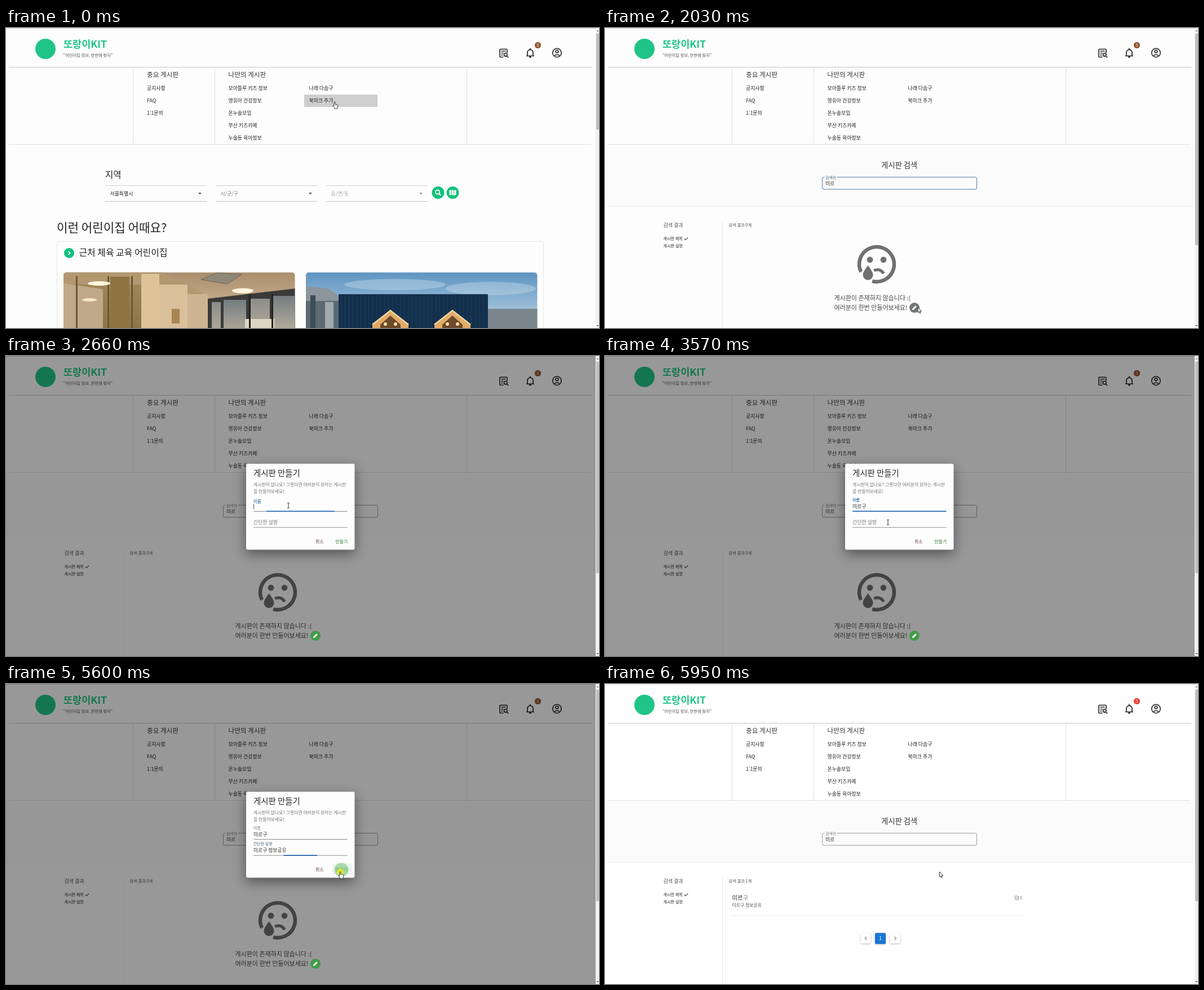
Recreate the animation shown at these times as an HTML page with a canvas. Size 1052 by 532 pixels, loop 6020 ms.

```html
<!DOCTYPE html>
<html lang="ko">
<head>
<meta charset="utf-8">
<style>
html, body { margin: 0; width: 100%; height: 100%; overflow: hidden; background: #fdfdfd; }
canvas { display: block; }
</style>
</head>
<body>
<canvas width="1052" height="532"></canvas>
<script>
const c = document.querySelector('canvas').getContext('2d');
const LOOP = 6020, STEP = 70, GREEN = '#0fc27b', BLUE = '#1976d2';
const PAGE = 280, EMPTY = 1120, OPEN = 2100, CLOSE = 5670, DONE = 5740;
let t = 0;

const ease = (start, dur = 200) => {
  const p = Math.min(1, Math.max(0, (t - start) / dur));
  return 1 - (1 - p) ** 3;
};
const between = (a, b) => t >= a && t < b;
const typed = (start, step, stages) =>
  t < start ? '' : stages[Math.min(stages.length - 1, Math.floor((t - start) / step))];

function text(s, x, cy, size, color = '#333', weight = 400, align = 'left') {
  c.font = `${weight} ${size}px "Noto Sans CJK KR", "Noto Sans CJK", sans-serif`;
  c.textAlign = align;
  c.fillStyle = color;
  c.fillText(s, x, cy + size * .37);
}
function rect(x, y, w, h, color, r = 0) {
  c.fillStyle = color;
  c.beginPath();
  c.roundRect(x, y, w, h, r);
  c.fill();
}
function frame(x, y, w, h, color, r, lw = 1) {
  c.strokeStyle = color;
  c.lineWidth = lw;
  c.beginPath();
  c.roundRect(x, y, w, h, r);
  c.stroke();
}
function disc(x, y, r, color, ry = r) {
  c.fillStyle = color;
  c.beginPath();
  c.ellipse(x, y, r, ry, 0, 0, 7);
  c.fill();
}
function ring(x, y, r, color, lw, a = 0, b = 2 * Math.PI) {
  c.strokeStyle = color;
  c.lineWidth = lw;
  c.beginPath();
  c.arc(x, y, r, a, b);
  c.stroke();
}
function path(d, x, y, fill, stroke, lw = 1) {
  const p = new Path2D(d);
  c.save();
  c.translate(x, y);
  if (fill) { c.fillStyle = fill; c.fill(p); }
  if (stroke) { c.strokeStyle = stroke; c.lineWidth = lw; c.stroke(p); }
  c.restore();
}
function alpha(a, draw) {
  c.save();
  c.globalAlpha *= a;
  draw();
  c.restore();
}
const hline = (x1, x2, y, color, h = 1) => rect(x1, y, x2 - x1, h, color);
const vline = (x, y1, y2, color) => rect(x, y1, 1, y2 - y1, color);

function gradient(x, y, w, h, ...colors) {
  const g = c.createLinearGradient(0, y, 0, y + h);
  colors.forEach((col, i) => g.addColorStop(i / (colors.length - 1), col));
  c.fillStyle = g;
  c.fillRect(x, y, w, h);
}

function header() {
  hline(0, 1046, 0, '#dcdcdc');
  disc(70, 37, 18, '#1fc486');
  text('또랑이KIT', 102, 29, 17.5, '#1fc486', 700);
  text('"어린이집 정보, 한번에 찾자"', 101.5, 48, 7.3, '#555');
  hline(5, 1040, 69, '#c6c6c6');

  const ink = '#222';
  path('M7 14.5H1.5a1 1 0 0 1-1-1V1.5a1 1 0 0 1 1-1h11a1 1 0 0 1 1 1V7M3 4h8M3 7.5h4M3 11h3', 875.5, 37, null, ink, 1.6);
  ring(886.3, 47.3, 2.8, ink, 1.6);
  path('M0 0L3 3', 888.3, 49.5, null, ink, 1.7);
  path('M0 13H14M2 13V7a5 5 0 0 1 10 0V13', 923, 36.5, null, ink, 1.7);
  disc(930, 37.5, 1.4, ink);
  disc(930, 51.3, 1.7, ink);
  ring(977.5, 44, 7.7, ink, 1.6);
  ring(977.5, 41.6, 2.4, ink, 1.6);
  path('M-5 5Q0 .5 5 5', 977.5, 44.5, null, ink, 1.6);
  disc(943.5, 30.5, 5.6, t >= DONE ? '#f44336' : '#92572f');
  text('5', 943.5, 30.6, 6.8, '#fff', 400, 'center');
}

function menu() {
  [225, 370, 817].forEach(x => vline(x, 70, 206, '#e1e1e1'));
  hline(5, 1039, 206, '#dedede');
  text('중요 게시판', 250, 83, 11.6);
  text('나만의 게시판', 394.5, 83, 11.6);
  if (t < PAGE) rect(529, 118, 130, 22, '#cecece');
  const column = (x, items) => items.forEach((s, i) => text(s, x, 107 + 22 * i, 8.9, '#222'));
  column(250, ['공지사항', 'FAQ', '1:1문의']);
  column(394.5, ['모아플루 키즈 정보', '영유아 건강정보', '온누솔모임', '부산 키즈카페', '누솔동 육아정보']);
  column(537.5, ['나래 다솜구', '북마크 추가']);
}

function roomPhoto() {
  gradient(102, 433, 411, 99, '#a98d6d', '#c4a987', '#b89a76');
  path('M0 0H175L245 36V99H0Z', 102, 433, '#b39770');
  gradient(102, 455, 170, 77, '#a08558', '#8e7346');
  path('M0 20L70 30V99H0Z', 102, 433, '#c0a988');
  rect(185, 441, 34, 91, '#8d7442');
  rect(240, 436, 32, 96, '#ddc397');
  rect(272, 455, 50, 77, '#d9c09a');
  rect(294, 498, 14, 26, '#a98454');
  rect(322, 472, 36, 60, '#cdb593');
  path('M0 18L155 0V70H0Z', 358, 462, '#3a3a38');
  [[365, 486, 16], [386, 482, 40], [432, 480, 36], [474, 475, 38]].forEach(([x, y, w], i) =>
    gradient(x, y, w, 60, i % 2 ? '#737c80' : '#8c8d88', '#b4ad9c'));
  rect(424, 516, 52, 16, '#ddd6c5');
  [124, 180, 222, 431, 471].forEach(x => rect(x, x > 300 ? 472 : 440, 3, 100, x > 300 ? '#222' : '#6d5632'));
  path('M0 12L28 0L72 3L46 20Z', 346, 434, '#8f8778', '#6d6558');
  disc(165, 453, 20, '#fff4dd', 4);
  disc(420, 466, 19, '#fff4dd', 4.5);
  disc(148, 482, 13, '#f6e5c4', 3);
}

function housePhoto() {
  gradient(532, 433, 411, 99, '#5f94c2', '#8db4d3', '#c3d3de');
  alpha(.35, () => { disc(690, 455, 90, '#d5e4ee', 10); disc(860, 462, 80, '#d5e4ee', 12); });
  path('M0 16L40 20L62 36V90H0Z', 532, 442, '#8c959c');
  path('M0 42H60V90H0Z', 532, 442, '#5c6a73');
  rect(540, 474, 9, 58, '#3f4c55');
  rect(566, 486, 15, 46, '#a2abb0');
  rect(855, 498, 88, 34, '#7a858c');
  rect(590, 472, 265, 60, '#12304b');
  alpha(.25, () => { for (let x = 594; x < 855; x += 7) vline(x, 472, 532, '#406582'); });
  [682, 792].forEach(x => {
    path('M0 0L32 25V40H-32V25Z', x, 500, '#e2ab68');
    path('M-32 26L0 1L32 26', x, 500, null, '#f2d4a4', 2.5);
    path('M0 10L18 26V40H-18V26Z', x, 500, '#6d4a2c');
    disc(x - 9, 525, 3, '#ffe2a5');
    disc(x + 9, 525, 3, '#ffe2a5');
  });
}

function homePage() {
  text('지역', 176, 260, 15.5, '#222');
  [['서울특별시', '#222'], ['시/군/구', '#777'], ['읍/면/동', '#aaa']].forEach(([s, color], i) => {
    const x = 176 + 196 * i;
    hline(x, x + 180, 279, '#d0d0d0');
    hline(x, x + 180, 307, '#c4c4c4');
    text(s, x + 8.5, 293.5, 8.9, color);
    path('M-3 -1.5H3L0 1.7Z', x + 168, 293.5, i < 2 ? '#555' : '#999');
  });
  disc(766.5, 292, 11, GREEN);
  ring(765.5, 291, 3.6, '#fff', 1.9);
  path('M0 0L3.2 3.2', 768, 293.5, null, '#fff', 2);
  disc(792.5, 292, 11, GREEN);
  path('M-6 -4L-2.4 -5.2V3.8L-6 5ZM-1.6 -5.2L1.6 -4V5L-1.6 3.8ZM2.4 -4L6 -5.2V3.8L2.4 5Z', 792.5, 292, '#fff');

  text('이런 어린이집 어때요?', 90, 354, 21.2, '#222');
  frame(90.5, 378.5, 863, 200, '#e6e6e6', 3);
  disc(112, 399, 9, GREEN);
  path('M-1.5 -3L1.7 0L-1.5 3', 112, 399, null, '#fff', 1.8);
  text('근처 체육 교육 어린이집', 129.5, 398, 15.9, '#222');
  [[102, roomPhoto], [532, housePhoto]].forEach(([x, photo]) => {
    c.save();
    c.beginPath();
    c.roundRect(x, 433.5, 410.5, 120, 5);
    c.clip();
    photo();
    c.restore();
  });
}

function searchBox() {
  const focus = ease(700) * (1 - ease(1960)), up = ease(700), value = typed(910, 140, ['ㅁ', '미', '밀', '미르']);
  const hover = between(560, 1260);
  frame(385.5, 264.5, 274, 21.5, hover ? '#333' : '#999', 3);
  alpha(focus, () => frame(385.5, 264.5, 274, 21.5, BLUE, 3, 1.7));
  if (up > 0) rect(389.5, 263, 22 * up, 3, '#fbfbfb');
  const label = color => text('검색어', 391, 275 - 10 * up, 8.8 - 2 * up, color);
  label('#777');
  alpha(focus, () => label(BLUE));
  text(value, 391, 275.3, 8.8, '#333');
  if (between(700, 1960) && t % 1060 < 780) vline(391 + c.measureText(value).width, 270, 280, '#555');
}

function item(y, title, rest, desc, count) {
  text(title, 225.5, y, 10.4, rest ? '#222' : '#555');
  if (rest) text(rest, 225.5 + c.measureText(title).width, y, 10.4, '#777');
  text(desc, 225.5, y + 13.5, 7.85, '#555');
  frame(727, y - 3, 5, 3.6, '#888', 1, .9);
  path('M2 5H7V-1M2 2V5', 726.5, y - 1.5, null, '#888', .9);
  text(count, 736.5, y, 7, '#777');
  hline(225, 741, y + 31, '#ebebeb');
}

function sadFace() {
  const gray = '#707070';
  ring(482, 419, 31, gray, 6.5, 2.69, 1.83 + 2 * Math.PI);
  disc(470, 411, 5.4, gray);
  disc(494, 411, 5.4, gray);
  path('M477 430Q488 425.5 494.5 435.5', 0, 0, null, gray, 5);
  path('M466.5 421C471 427 475.5 433 475.5 438A9 9 0 0 1 457.5 438C457.5 433 462 427 466.5 421Z', 0, 0, gray, '#fdfdfd', 2.5);
  path('M466.5 421C471 427 475.5 433 475.5 438A9 9 0 0 1 457.5 438C457.5 433 462 427 466.5 421Z', 0, 0, gray);
  text('게시판이 존재하지 않습니다 :(', 406.5, 479, 11, '#444');
  text('여러분이 한번 만들어보세요!', 406.5, 495.5, 11, '#444');
}

function pencilButton() {
  disc(549, 496, 9, between(1820, OPEN) ? '#747778' : '#409c48');
  path('M-4 4V1.8L1.8 -4L4 -1.8L-1.8 4Z', 549, 496, '#eee');
}

function pagination() {
  c.save();
  c.shadowColor = 'rgba(0,0,0,.3)';
  c.shadowBlur = 3;
  c.shadowOffsetY = 1;
  rect(453.5, 442, 18, 18, '#fff', 2);
  rect(506, 442, 18, 18, '#fff', 2);
  rect(479, 441.5, 19, 19.5, BLUE, 2);
  c.restore();
  path('M1.5 -3L-1.5 0L1.5 3', 462.5, 451, null, '#888', 1.1);
  path('M-1.5 -3L1.5 0L-1.5 3', 515, 451, null, '#888', 1.1);
  text('1', 488.5, 451, 9, '#fff', 400, 'center');
}

function searchPage() {
  rect(0, 207, 1046, 109, '#fbfbfb');
  hline(0, 1046, 316, '#ededed');
  text('게시판 검색', 490, 243, 13.3, '#333');
  searchBox();
  const count = t < EMPTY ? 15 : t < DONE ? 0 : 1;
  text('검색 결과', 103.5, 350, 9, '#555');
  text('게시판 제목', 103.5, 373, 7.1, '#222');
  text('게시판 설명', 103.5, 386, 7.1, '#222');
  path('M-3 0L-1 2.2L3.2 -2.2', 144, 373.5, null, '#444', 1.2);
  vline(208, 343, 532, '#eaeaea');
  text(`검색 결과 ${count}개`, 219, 349, 7.35, '#555');
  if (count === 15) {
    item(379, '공지사항', '', '또랑이KIT의 공지 게시판입니다.', '2');
    item(441.5, 'FAQ', '', '질답 게시판입니다.', '0');
    item(504, '1:1문의', '', '운영진에게 문의를 남겨주세요!', '1');
  } else if (count === 0) {
    sadFace();
  } else {
    item(379, '미르', '구', '미르구 정보공유', '0');
    pagination();
  }
}

function field(name, y, value, start, end) {
  const up = ease(start), out = ease(end), focus = up * (1 - out);
  const label = color => text(name, 439, y - 11.5 * up, 8.9 - 2 * up, color);
  label('#777');
  alpha(focus, () => label(BLUE));
  hline(439, 605.5, y + 8.5, '#8c8c8c');
  hline(522.3 - 83.2 * focus, 522.3 + 83.2 * focus, y + 8, '#2367b5', 1.7);
  text(value, 439, y, 8.8, '#333');
  if (between(start, end) && (t - start) % 1060 < 560) vline(439 + c.measureText(value).width, y - 4, y + 5, '#555');
}

function dialog() {
  c.save();
  c.shadowColor = 'rgba(0,0,0,.45)';
  c.shadowBlur = 22;
  c.shadowOffsetY = 8;
  rect(426, 191, 192.5, 152.5, '#fdfdfd', 3);
  c.restore();
  text('게시판 만들기', 439, 207.5, 14.4, '#222');
  text('게시판이 없나요? 그렇다면 여러분이 원하는 게시판', 439, 228, 7.85, '#777');
  text('을 만들어보세요!', 439, 240.5, 7.85, '#777');
  field('이름', 266.5, typed(2800, 140, ['ㅁ', '미', '밀', '미르', '미륵', '미르구']), 2590, 3850);
  field('간단한 설명', 295, typed(4060, STEP, ['ㅁ', '미', '밀', '미르', '미륵', '미르구', '미르구 ',
    ...['ㅈ', '저', '정', '정ㅂ', '정보', '정복', '정보고', '정보공', '정보공ㅇ', '정보공유'].map(s => '미르구 ' + s)]), 3850, 5542);
  if (between(4410, 4480)) {
    rect(455, 290, 9, 10, '#1677d8');
    text('구', 455.2, 295, 8.8, '#0b3a78');
  }
  text('취소', 549, 329, 7.9, '#6b3a3a', 500);
  if (between(5460, CLOSE)) rect(579, 319, 35, 20, '#edf3ee', 2);
  text('만들기', 584.5, 329, 7.9, '#2e7d32', 500);
  if (between(5530, CLOSE)) disc(595, 329.5, 12.5 * Math.min(1, (t - 5390) / 210), 'rgba(120,200,125,.6)');
}

function scrollbar() {
  rect(1046, 0, 6, 532, '#f1f1f1');
  rect(1047, 10, 5, (t < PAGE ? 180 : t < EMPTY ? 244 : 385) - 10, '#bfbfbf');
  path('M-2 1L0 -1L2 1Z', 1049.5, 5, '#777');
  path('M-2 -1L0 1L2 -1Z', 1049.5, 528, '#444');
}

const route = [[0, 583, 131], [210, 583, 131], [560, 441, 271], [1190, 441, 271], [1540, 616, 390], [1820, 555, 495.5],
  [2520, 555, 495.5], [2590, 501, 265], [3500, 501, 265], [3640, 503, 325], [3780, 503, 298], [5250, 503, 298],
  [5530, 593, 333], [LOOP, 593.5, 333]];

function pointer() {
  const i = route.findIndex(k => k[0] > t), [t0, x0, y0] = route[i - 1], [t1, x1, y1] = route[i];
  const k = (t - t0) / (t1 - t0), x = x0 + (x1 - x0) * k, y = y0 + (y1 - y0) * k;
  const clicks = [[70, 210], [700, 840], [1960, 2030], [2590, 2660], [3780, 3920], [5530, 5670]];
  if (clicks.some(([a, b]) => between(a, b))) disc(x, y, 6, 'rgba(244,232,30,.8)');
  if (between(490, 1260) || between(2590, 5320)) {
    path('M-2 -4.5H-.6L0 -4L.6 -4.5H2M0 -4V4M-2 4.5H-.6L0 4L.6 4.5H2', x, y, null, '#333', 1);
  } else if (t < PAGE || between(5320, CLOSE)) {
    path('M-1 .5Q0 -.8 1 .5V4.3L5 5.2Q6 5.6 5.8 7L5 10V12H-.5V10.5L-3.6 7Q-3.2 5.4 -1 7Z', x, y, '#fff', '#222', .9);
  } else {
    path('M0 0V9.2L2.1 7.3L3.6 10.6L5 10L3.6 6.8H6.4Z', x, y, '#fff', '#222', .9);
  }
}

function draw(now) {
  t = Math.floor(now % LOOP / STEP) * STEP;
  rect(0, 0, 1052, 532, t >= DONE ? '#fff' : '#fdfdfd');
  header();
  menu();
  if (t < PAGE) homePage(); else searchPage();
  const open = ease(OPEN, 210) * (1 - ease(CLOSE, 210));
  alpha(open, () => rect(0, 0, 1046, 532, 'rgba(0,0,0,.4)'));
  if (between(EMPTY, DONE)) pencilButton();
  if (open > 0) alpha(open, dialog);
  scrollbar();
  pointer();
  requestAnimationFrame(draw);
}
requestAnimationFrame(draw);
</script>
</body>
</html>
```
